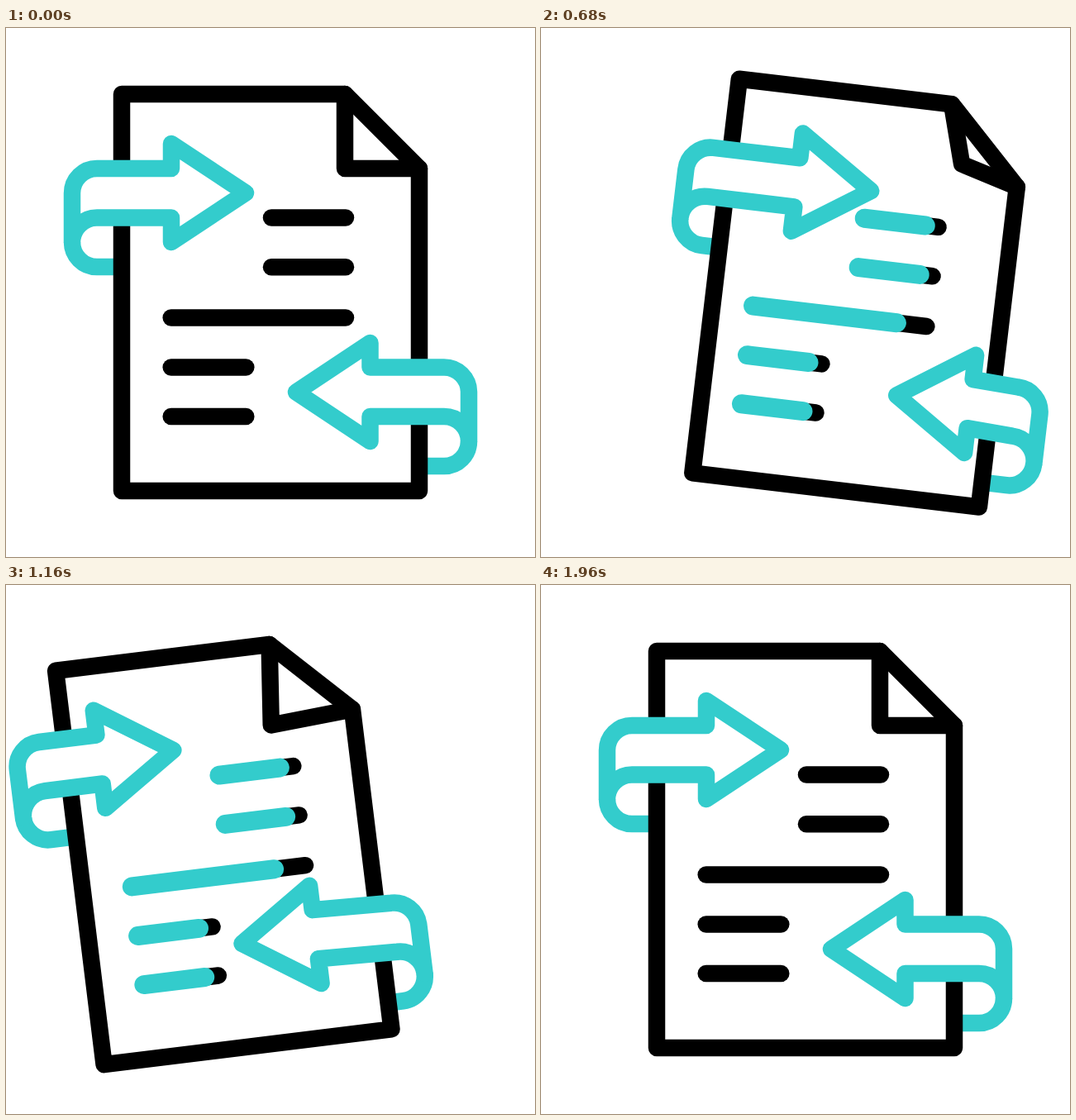
Animation, 640 px wide and 640 px high, one loop 2000 ms. Source, as an HTML page:

```html
<!DOCTYPE html>
<html lang="en">
<head>
<meta charset="utf-8">
<title>Document exchange</title>
<style>
  html, body { margin: 0; width: 100%; height: 100%; overflow: hidden; background: #fff; }
  svg { display: block; width: 100%; height: 100%; }
  path { fill: none; stroke: #000; stroke-width: 20.5; stroke-linecap: round; stroke-linejoin: round; }
  .teal { stroke: #3cc; }
  .ribbon { fill: #fff; }
  .tail { stroke-linecap: butt; }
  .fill { stroke-width: 23; }
</style>
</head>
<body>
<svg viewBox="0 0 640 640">
  <g id="doc">
    <path id="tailL" class="teal tail"/>
    <path id="tailR" class="teal tail"/>
    <path id="page"/>
    <path id="fold"/>
    <g id="rows"></g>
    <path id="arrowL" class="teal ribbon"/>
    <path id="arrowR" class="teal ribbon"/>
  </g>
</svg>
<script>
const LOOP = 2000, STEP = 40;
const ROWS = [[321, 411, 229.5], [321, 411, 289.3], [199.7, 411, 350.5], [199.7, 290.3, 410.5], [199.7, 290.3, 470]];
const $ = id => document.getElementById(id);
const draw = (id, d) => $(id).setAttribute('d', d);

// Eased value at time t through [time, value] keys.
function track(t, ...keys) {
  if (t <= keys[0][0]) return keys[0][1];
  for (let i = 1; i < keys.length; i++) {
    const [t0, a] = keys[i - 1], [t1, b] = keys[i];
    if (t < t1) {
      const p = (t - t0) / (t1 - t0);
      return a + (b - a) * p * p * (3 - 2 * p);
    }
  }
  return keys[keys.length - 1][1];
}
const sway = (t, right, left) => track(t, [120, 0], [640, right], [1160, left], [1920, 0]);
const lift = (t, v) => track(t, [120, 0], [1160, v], [1920, 0]);

const rows = ROWS.map(([x0, x1, y]) => {
  const add = cls => {
    const p = document.createElementNS('http://www.w3.org/2000/svg', 'path');
    p.setAttribute('class', cls);
    return $('rows').appendChild(p);
  };
  add('').setAttribute('d', `M${x0} ${y}H${x1}`);
  return { x0, x1, y, bar: add('teal fill') };
});

function drawPage(t) {
  const l = 140 + sway(t, 11, 0), r = 500 + sway(t, 0, -9.5), f = r - 90;
  draw('page', `M${l} 80H${f}L${r} 170V560H${l}Z`);
  draw('fold', `M${f} 80L${f + sway(t, 21, -9.8)} ${170 + sway(t, -20, 7)}L${r} 170`);
  return [l, r];
}

function drawLeftArrow(t, edge) {
  const x = 80 + sway(t, 20, -0.5), h = 200 + sway(t, 36, -20.5), y = lift(t, -6.8);
  draw('tailL', `M${edge} ${289 + y}H${x + 30}A30 30 0 0 1 ${x} ${259 + y}`);
  draw('arrowL', `M${x} ${259 + y}V${200 + y}A30 30 0 0 1 ${x + 30} ${170 + y}` +
    `L${h} ${170 + y}V${140 + y}L${h + 90} ${199.5 + y}L${h} ${259 + y}V${229.5 + y}` +
    `L${x + 30} ${229.5 + y}A30 30 0 0 0 ${x} ${259 + y}Z`);
}

function drawRightArrow(t, edge) {
  const x = 560 + sway(t, 0, -21.5), h = 440.5 + sway(t, 35, -27.5);
  const y = sway(t, 0, -2.2), k = lift(t, -5.4);
  draw('tailR', `M${edge} ${530 + y}H${x - 30}A30 30 0 0 0 ${x} ${500 + y}`);
  draw('arrowR', `M${x} ${500 + y}V${440 + y}A30 30 0 0 0 ${x - 30} ${410.5 + y}` +
    `L${h} ${410.5 + k}V${381 + k}L${h - 89.5} ${440.5 + k}L${h} ${500 + k}V${470 + k}` +
    `L${x - 30} ${470 + y}A30 30 0 0 1 ${x} ${500 + y}Z`);
}

function drawRows(t) {
  const p = track(t, [120, 0], [880, 1], [1920, 0]);
  for (const { x0, x1, y, bar } of rows) {
    bar.setAttribute('d', p > 0 ? `M${x0} ${y}H${x0 + (x1 - x0) * p}` : '');
  }
}

function render(t) {
  const shift = track(t, [200, 0], [640, 61.5], [1160, -52], [1800, 0]);
  $('doc').setAttribute('transform', `translate(${shift} 0) rotate(${sway(t, 7, -7)} 320 320)`);
  const [l, r] = drawPage(t);
  drawLeftArrow(t, l);
  drawRightArrow(t, r);
  drawRows(t);
}

const start = performance.now();
function tick() {
  const t = (performance.now() - start) % LOOP;
  render(Math.floor(t / STEP) * STEP);
  requestAnimationFrame(tick);
}
tick();
</script>
</body>
</html>
```
